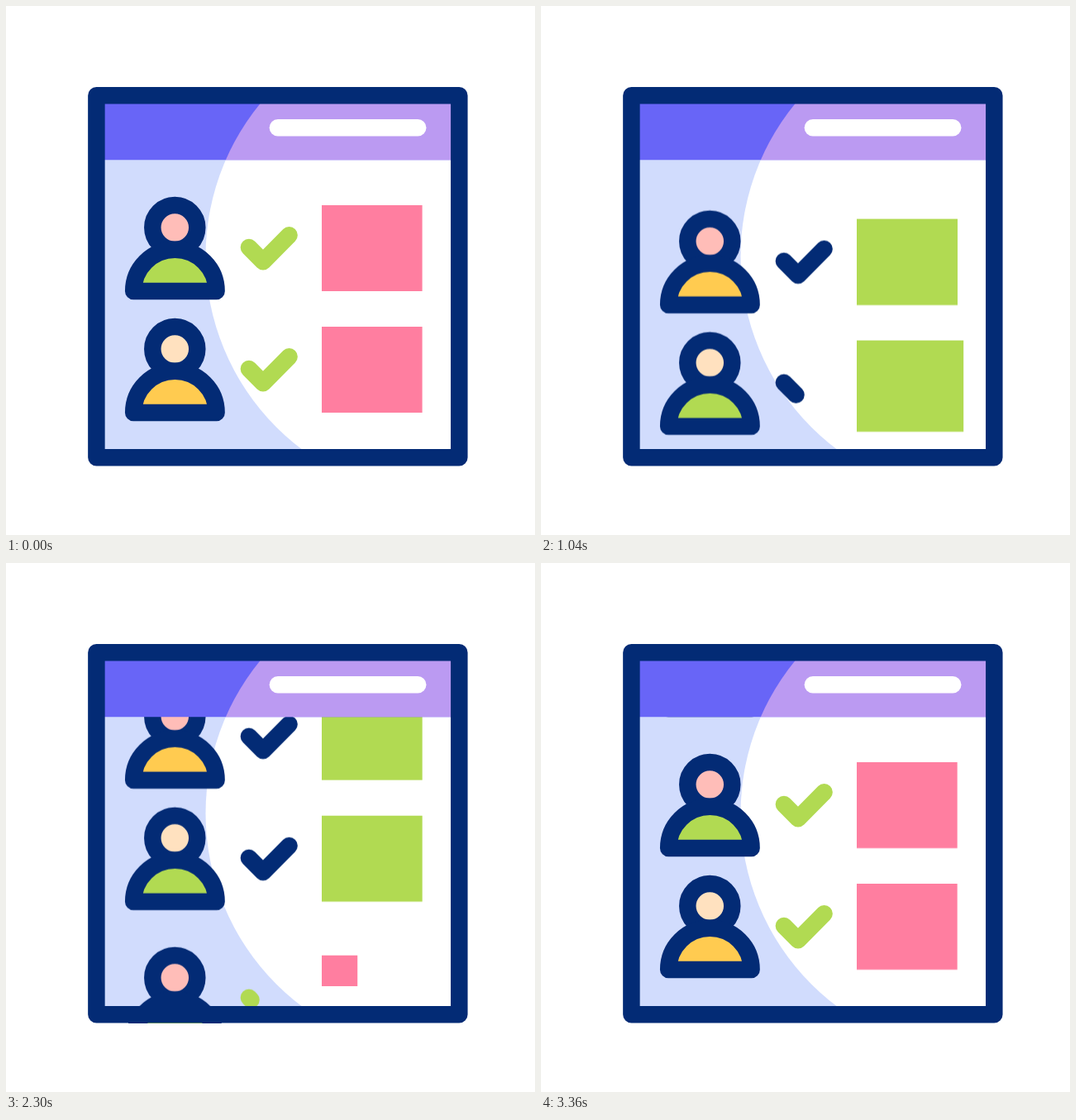
An HTML page for the animation above (3.62 s loop, 640x640 px).

```html
<!DOCTYPE html>
<html lang="en">
<head>
<meta charset="utf-8">
<title>Scrolling list</title>
<style>
  :root {
    --navy: #032b75;
    --green: #b1da52;
    --yellow: #ffcb50;
    --pink: #ff7ea0;
    --rose: #ffbdb8;
    --cream: #ffe1bf;
    --loop: 3620ms;
    --ease: cubic-bezier(.3333, 0, .6667, 1);
  }
  html, body { margin: 0; width: 100%; height: 100%; overflow: hidden; background: #fff; }
  svg { display: block; width: 100%; height: 100%; }

  .line { fill: none; stroke-width: 20.5; stroke-linecap: round; stroke-linejoin: round; }
  .outline { stroke: var(--navy); stroke-width: 20.5; stroke-linejoin: round; }
  .rose { fill: var(--rose); }
  .cream { fill: var(--cream); }
  .green { fill: var(--green); }
  .yellow { fill: var(--yellow); }

  .list, .card, .tick { animation: var(--loop) var(--ease) infinite both; }
  .card { transform-origin: 382px 241px; }
  .tick { stroke-dasharray: 1 3; }

  .first { animation-name: first-scroll; }
  .first .card { fill: var(--pink); animation-name: first-card; }
  .first .tick { stroke: var(--green); animation-name: first-tick; }

  .second { animation-name: second-scroll; }
  .second .card { fill: var(--green); animation-name: second-card; }
  .second .tick { stroke: var(--navy); animation-name: second-tick; }

  /* lower rows follow the upper ones */
  .lower .card { animation-delay: 294ms; }
  .first .lower .tick { animation-delay: 440ms; }
  .second .lower .tick { animation-delay: 480ms; }

  @keyframes first-scroll {
    0% { transform: translateY(0); }
    33.149% { transform: translateY(-345.5px); }
    33.15%, 52.486% { transform: translateY(316px); }
    85.635%, 100% { transform: translateY(0); }
  }
  @keyframes second-scroll {
    0% { transform: translateY(345.5px); }
    33.149%, 52.486% { transform: translateY(0); }
    85.635%, 100% { transform: translateY(-316px); }
  }
  @keyframes first-card {
    0%, 33.149% { transform: scale(1); }
    33.15%, 62.597% { transform: scale(.34); }
    73.646% { transform: scale(1.1); }
    80.829%, 100% { transform: scale(1); }
  }
  @keyframes second-card {
    0%, 11.215% { transform: scale(.296); }
    22.265% { transform: scale(1.11); }
    29.448%, 100% { transform: scale(1); }
  }
  @keyframes first-tick {
    0%, 33.149% { stroke-dashoffset: 0; opacity: 1; }
    33.15%, 60.773% { stroke-dashoffset: 1; opacity: 0; }
    60.774% { opacity: 1; }
    80.663%, 100% { stroke-dashoffset: 0; opacity: 1; }
  }
  @keyframes second-tick {
    0%, 8.287% { stroke-dashoffset: 1; opacity: 0; }
    8.288% { opacity: 1; }
    28.177%, 100% { stroke-dashoffset: 0; opacity: 1; }
  }
</style>
</head>
<body>
<svg viewBox="0 0 640 640">
  <defs>
    <clipPath id="panel"><rect x="110" y="109" width="438" height="437"/></clipPath>
    <clipPath id="view"><rect x="110" y="180" width="438" height="376.6"/></clipPath>
    <circle id="head" class="outline" cx="204.3" cy="268" r="27"/>
    <path id="torso" class="outline" d="M154.2 345a50.2 50.2 0 0 1 100.4 0z"/>
    <path id="check" class="line" pathLength="1" d="M293.9 292.1L311 309.2L342.6 277.2"/>
    <rect id="square" x="382" y="241" width="121.6" height="104"/>
    <circle id="glow" cx="533.5" cy="303" r="292"/>
  </defs>

  <g clip-path="url(#panel)">
    <rect x="109" y="108" width="440" height="439" fill="#d1dcfd"/>
    <use href="#glow" fill="#fff"/>
  </g>

  <g clip-path="url(#view)">
    <g class="list first">
      <g>
        <use href="#head" class="rose"/>
        <use href="#torso" class="green"/>
        <use href="#check" class="tick"/>
        <use href="#square" class="card"/>
      </g>
      <g class="lower" transform="translate(0 147)">
        <use href="#head" class="cream"/>
        <use href="#torso" class="yellow"/>
        <use href="#check" class="tick"/>
        <use href="#square" class="card"/>
      </g>
    </g>
    <g class="list second">
      <g>
        <use href="#head" class="rose"/>
        <use href="#torso" class="yellow"/>
        <use href="#check" class="tick"/>
        <use href="#square" class="card"/>
      </g>
      <g class="lower" transform="translate(0 147)">
        <use href="#head" class="cream"/>
        <use href="#torso" class="green"/>
        <use href="#check" class="tick"/>
        <use href="#square" class="card"/>
      </g>
    </g>
  </g>

  <clipPath id="bar"><rect x="110" y="109" width="438" height="77.2"/></clipPath>
  <g clip-path="url(#bar)">
    <rect x="109" y="108" width="440" height="80" fill="#6865f7"/>
    <use href="#glow" fill="#bb9af2"/>
  </g>
  <path class="line" stroke="#fff" d="M328.9 147.2H498.2"/>
  <rect class="outline" fill="none" x="109.4" y="108.3" width="438.9" height="438"/>
</svg>
</body>
</html>
```
